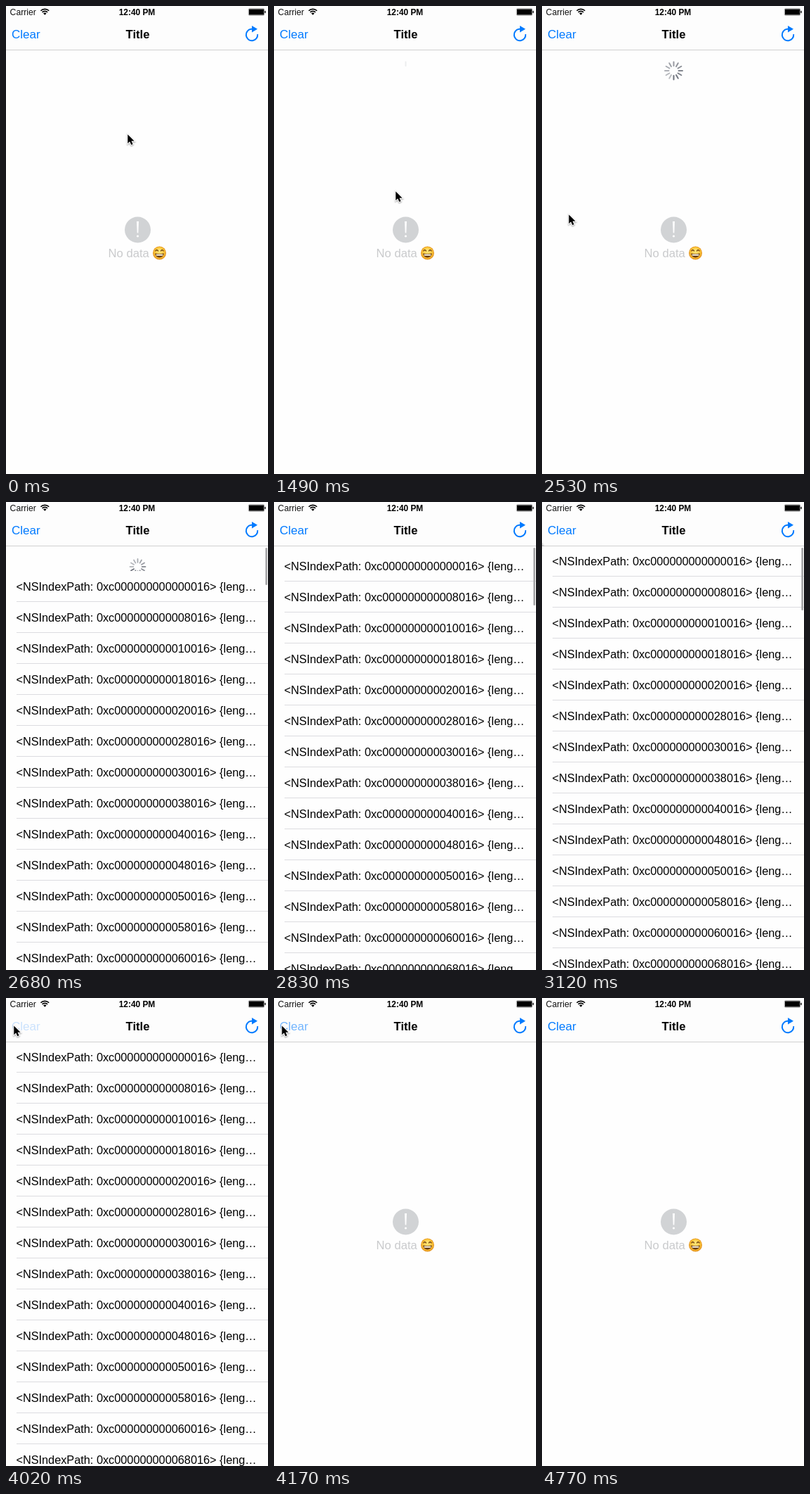
An HTML page with a canvas that plays this animation: 373 px wide and 665 px high, repeating every 6.12 s.

```html
<!DOCTYPE html>
<html lang="en">
<head>
<meta charset="utf-8">
<title>Pull to refresh</title>
<style>
html, body { margin: 0; width: 100%; height: 100%; overflow: hidden; background: #fefefe; }
canvas { display: block; width: 373px; height: 665px; }
</style>
</head>
<body>
<canvas id="stage"></canvas>
<script>
const W = 373, H = 665, LOOP = 6120;
const BLUE = '#007aff', FONT = '"Liberation Sans", Arial, sans-serif';
const NAV_BOTTOM = 62, ROW = 44;
const SHOW_ROWS = 2680, HIDE_ROWS = 4170;

const steps = [
  [0, 172, 181], [1490, 172, 262], [1640, 170, 361], [1790, 167, 421],
  [1940, 166, 471], [2090, 168, 504], [2230, 172, 542], [2380, 173, 538],
  [2530, 37, 295], [2680], [2830], [2970], [3120, -10, 49],
  [3270, 5, 40], [3420, 9, 38], [3570, 10, 38], [4020, 10, 38],
  [4170, 10, 38], [4320, 10, 38], [4620, 9, 91], [4770]
];

const canvas = document.getElementById('stage');
const ctx = canvas.getContext('2d');
const dpr = window.devicePixelRatio || 1;
canvas.width = Math.round(W * dpr);
canvas.height = Math.round(H * dpr);

function text(str, x, y, size, color, weight = '', align = 'left') {
  ctx.font = `${weight} ${size}px ${FONT}`;
  ctx.textAlign = align;
  ctx.fillStyle = color;
  ctx.fillText(str, x, y);
}

function rect(x, y, w, h, color) {
  ctx.fillStyle = color;
  ctx.fillRect(x, y, w, h);
}

function disc(x, y, r, color) {
  ctx.fillStyle = color;
  ctx.beginPath();
  ctx.arc(x, y, r, 0, Math.PI * 2);
  ctx.fill();
}

function arc(x, y, r, from, to, width, color) {
  ctx.strokeStyle = color;
  ctx.lineWidth = width;
  ctx.beginPath();
  ctx.arc(x, y, r, from, to);
  ctx.stroke();
}

function polygon(points) {
  ctx.beginPath();
  points.forEach(([x, y]) => ctx.lineTo(x, y));
  ctx.closePath();
}

function pill(x, y, w, h, color) {
  ctx.fillStyle = color;
  ctx.beginPath();
  ctx.roundRect(x, y, w, h, Math.min(w, h) / 2);
  ctx.fill();
}

function drawStatusBar() {
  text('Carrier', 5.6, 13, 12.2, '#111');
  text('12:40 PM', 186.5, 13, 11.9, '#000', 'bold', 'center');
  const a = Math.PI * 0.25;
  for (const r of [8.3, 5.3]) {
    arc(55.3, 12.6, r, -Math.PI / 2 - a, -Math.PI / 2 + a, 1.7, '#000');
  }
  ctx.fillStyle = '#000';
  ctx.beginPath();
  ctx.moveTo(55.3, 12.8);
  ctx.arc(55.3, 12.8, 3.2, -Math.PI / 2 - a, -Math.PI / 2 + a);
  ctx.fill();
  ctx.strokeStyle = '#555';
  ctx.lineWidth = 0.6;
  ctx.beginPath();
  ctx.roundRect(345.3, 3.8, 22.4, 9.4, 1.5);
  ctx.stroke();
  rect(346, 4.5, 21, 8, '#000');
  pill(368.2, 6.7, 1.4, 3.6, '#000');
}

function drawReload() {
  arc(350, 41, 8.2, -0.12, Math.PI * 1.5, 2, BLUE);
  ctx.fillStyle = BLUE;
  polygon([[350, 28], [358, 32.8], [350, 37.6]]);
  ctx.fill();
}

function clearAlpha(t) {
  if (t < 4020 || t >= 4320) return 1;
  return t < 4170 ? 0.2 : 0.55;
}

function drawNav(t) {
  rect(0, 0, W, NAV_BOTTOM, '#fdfdfd');
  rect(0, NAV_BOTTOM, W, 1, '#cfcfd1');
  drawStatusBar();
  ctx.globalAlpha = clearAlpha(t);
  text('Clear', 8, 46, 17, BLUE);
  ctx.globalAlpha = 1;
  text('Title', 187.5, 46, 16.6, '#000', 'bold', 'center');
  drawReload();
}

function drawSmiley(x, y) {
  const skin = ctx.createRadialGradient(x, y - 3, 2, x, y, 9.6);
  skin.addColorStop(0, '#ffe070');
  skin.addColorStop(0.65, '#fbc437');
  skin.addColorStop(1, '#e08d1c');
  disc(x, y, 9.5, skin);
  ctx.lineCap = 'round';
  for (const side of [-1, 1]) {
    arc(x + side * 3.8, y - 2.4, 1.8, Math.PI * 1.1, Math.PI * 1.9, 1.3, '#6a3d0c');
  }
  ctx.lineCap = 'butt';
  ctx.fillStyle = '#653a12';
  ctx.beginPath();
  ctx.moveTo(x - 6.4, y + 0.6);
  ctx.quadraticCurveTo(x, y + 2, x + 6.4, y + 0.6);
  ctx.bezierCurveTo(x + 5.5, y + 8.4, x - 5.5, y + 8.4, x - 6.4, y + 0.6);
  ctx.fill();
  pill(x - 5, y + 1.7, 10, 2, '#fff8e6');
}

function drawEmpty() {
  disc(187.5, 318, 18.5, '#d1d3d5');
  ctx.fillStyle = '#fefefe';
  polygon([[186, 306], [189, 306], [188.3, 322.5], [186.7, 322.5]]);
  ctx.fill();
  disc(187.5, 327, 1.6, '#fefefe');
  text('No data', 145.6, 357, 16.6, '#c9cacc');
  drawSmiley(218.5, 351);
}

// While pulled, ticks appear clockwise; then the dark head circles once a second
function tickAlpha(i, t) {
  if (t < 1640) return i === 0 ? 0.12 : 0;
  if (t < 2090) {
    const shown = t < 1790 ? 6 : t < 1940 ? 9 : 10;
    return i <= shown ? 0.85 : 0;
  }
  const head = 6 + Math.round((t - 2530) * 12 / 1000);
  const age = (((head - i) % 12) + 12) % 12;
  return 1 - age * 0.05;
}

function drawSpinner(t) {
  if (t < 1490 || t >= 2830) return;
  ctx.save();
  ctx.translate(187.5, 92);
  if (t >= SHOW_ROWS) ctx.scale(0.88, 0.88);
  for (let i = 0; i < 12; i++) {
    ctx.globalAlpha = tickAlpha(i, t);
    pill(-1, -13.5, 2, 7.5, '#6d717b');
    ctx.rotate(Math.PI / 6);
  }
  ctx.restore();
}

function drawRows(t) {
  const shift = Math.round(36 * Math.exp((SHOW_ROWS - t) / 88));
  rect(0, NAV_BOTTOM + shift, W, H, '#fefefe');
  for (let i = 0; i < 14; i++) {
    const y = NAV_BOTTOM + shift + i * ROW;
    const address = (i * 0x8000 + 0x16).toString(16).padStart(15, '0');
    text(`<NSIndexPath: 0xc${address}> {leng…`, 14.4, y + 28, 16.3, '#000');
    rect(15, y + 43, W - 15, 1, '#dcdce0');
  }
  if (t < 3270) pill(369.3, 65, 2.7, 89 - shift, '#a6a6a8');
}

function drawPointer(x, y) {
  ctx.save();
  ctx.translate(x, y);
  polygon([[1.3, 1.5], [1.3, 14.2], [4.2, 11.5], [6.3, 16.3],
    [8.6, 15.3], [6.5, 10.7], [10.6, 10.7]]);
  ctx.shadowColor = 'rgba(0,0,0,0.4)';
  ctx.shadowBlur = 2 * dpr;
  ctx.shadowOffsetY = dpr;
  ctx.strokeStyle = '#fff';
  ctx.lineWidth = 2;
  ctx.stroke();
  ctx.shadowColor = 'transparent';
  ctx.fillStyle = '#000';
  ctx.fill();
  ctx.restore();
}

function draw(now) {
  const time = now % LOOP;
  const [t, x, y] = steps.findLast(step => step[0] <= time);
  ctx.setTransform(dpr, 0, 0, dpr, 0, 0);
  rect(0, 0, W, H, '#fefefe');
  drawSpinner(t);
  if (t >= SHOW_ROWS && t < HIDE_ROWS) drawRows(t);
  else drawEmpty();
  drawNav(t);
  if (x !== undefined) drawPointer(x, y);
}

const start = performance.now();
function tick() {
  draw(performance.now() - start);
  requestAnimationFrame(tick);
}
tick();
</script>
</body>
</html>
```
